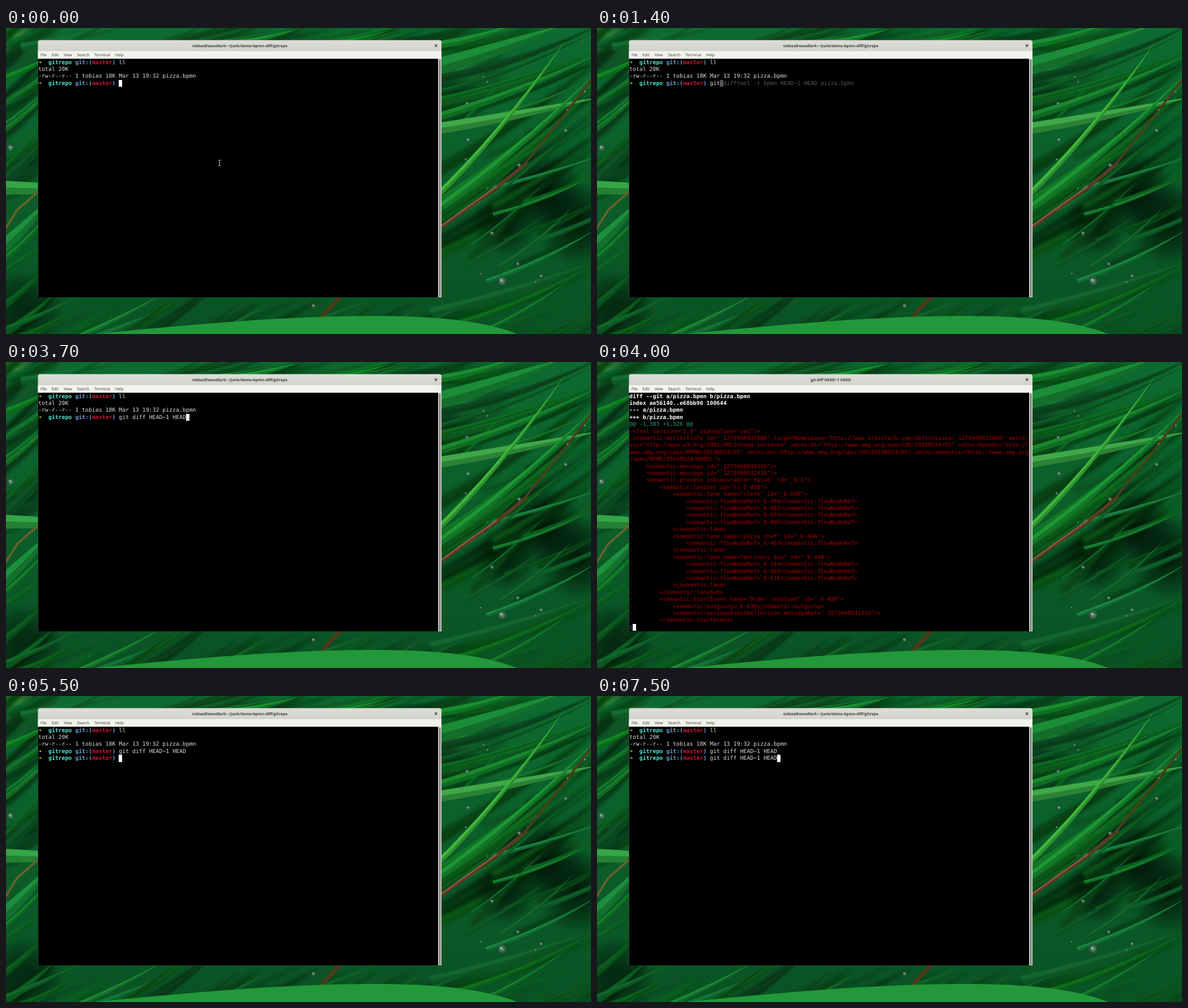
Write an HTML page with a canvas that moves like this. It is 1033 px wide and 542 px high and loops after 8 s.

```html
<!DOCTYPE html>
<html lang="en">
<head>
<meta charset="utf-8">
<title>Terminal diff</title>
<style>
  html, body { margin: 0; width: 100%; height: 100%; overflow: hidden; background: #0d5c26; }
  #stage { position: absolute; left: 0; top: 0; width: 1033px; height: 542px; overflow: hidden;
    text-rendering: geometricPrecision; }
  #stage > * { position: absolute; }
  #title, #menu { white-space: pre; font-family: "Open Sans", "Noto Sans", sans-serif; }
  #title { left: 57px; top: 22px; width: 712px; line-height: 19px; text-align: center;
    font-size: 6.8px; font-weight: 700; color: #3a3e40; }
  #menu { left: 61px; top: 41px; display: flex; gap: 8.8px; line-height: 15px;
    font-size: 6.9px; color: #33383a; }
  #term { left: 0; top: 0; }
  #term span { position: absolute; white-space: pre; height: 12.4px; line-height: 14.4px;
    font-family: "DejaVu Sans Mono", monospace; font-size: 9.85px; color: #dcdcdc; }
  #term .bold { color: #fff; font-weight: 700; }
  #term .arrow { color: #8ae234; font-weight: 700; }
  #term .dir { color: #4fe6d2; font-weight: 700; }
  #term .git { color: #729fcf; font-weight: 700; }
  #term .branch { color: #cb1630; font-weight: 700; }
  #term .hint { color: #555753; }
  #term .hunk { color: #2a9a7c; }
  #term .del { color: #a80000; }
  #term .cursor { background: #fff; }
  #term .ghost { background: #555753; color: #000; }
</style>
</head>
<body>
<div id="stage">
  <canvas id="art" width="1033" height="542"></canvas>
  <div id="title"></div>
  <div id="menu"><span>File</span><span>Edit</span><span>View</span><span>Search</span><span>Terminal</span><span>Help</span></div>
  <div id="term"></div>
  <svg id="beam" width="8" height="12" style="left:373px;top:233px">
    <path d="M1.5 1.2H3.4L4 1.8L4.6 1.2H6.5M4 1.8V10.2M1.5 10.8H3.4L4 10.2L4.6 10.8H6.5M3 6H5"
      fill="none" stroke="#b4b4b4" stroke-width="1.1"/>
  </svg>
</div>
<script>
const title = document.getElementById('title');
const term = document.getElementById('term');
const beam = document.getElementById('beam');
const ctx = document.getElementById('art').getContext('2d');

/* ---------- wallpaper ---------- */
let seed = 11;
function rnd(a = 0, b = 1) {
  seed = (seed * 16807) % 2147483647;
  return a + (b - a) * seed / 2147483647;
}

const green = light => `hsl(${rnd(128, 144)} ${rnd(66, 82)}% ${light}%)`;

function glow(x, y, r, color) {
  const g = ctx.createRadialGradient(x, y, 0, x, y, r);
  g.addColorStop(0, color);
  g.addColorStop(1, 'transparent');
  ctx.fillStyle = g;
  ctx.fillRect(x - r, y - r, 2 * r, 2 * r);
}

// Tapered leaf that sags below its chord, with a shaded lower half
function blade(x, y, dx, dy, w, color, sag = .12) {
  const len = Math.hypot(dx, dy);
  const nx = dy / len * w / 2, ny = -dx / len * w / 2;
  const cx = x + dx * .5, cy = y + dy * .5 + len * sag;
  const half = (a, b, fill) => {
    ctx.fillStyle = fill;
    ctx.beginPath();
    ctx.moveTo(x + nx * a, y + ny * a);
    ctx.quadraticCurveTo(cx + nx * a, cy + ny * a, x + dx, y + dy);
    ctx.quadraticCurveTo(cx + nx * b, cy + ny * b, x + nx * b, y + ny * b);
    ctx.fill();
  };
  half(1, -1, color);
  half(0, -1, 'rgba(0,40,12,.3)');
}

// Each place returns x, y, dx, dy for one leaf
const places = {
  right() {
    const y = rnd(40, 640), steep = Math.exp(-(((y - 320) / 90) ** 2));
    return [750, y, 300, -70 - 130 * steep - rnd(0, 60)];
  },
  rightTips() {
    const y = rnd(160, 600);
    return [rnd(780, 940), y, rnd(110, 220), -rnd(60, 150)];
  },
  left() { return [-20, rnd(20, 580), 110, -rnd(40, 130)]; },
  bottom() { return [rnd(-80, 740), 560, rnd(110, 240), -rnd(50, 100)]; },
  top() { return [rnd(0, 800), 34, rnd(110, 220), -rnd(20, 60)]; }
};

function grow(place, n, dark, light, width) {
  for (let i = 0; i < n; i++)
    blade(...places[place](), rnd(width * .4, width), green(rnd(dark, light)), rnd(.02, .1));
}

function stem(width, color, ...points) {
  ctx.beginPath();
  points.forEach(([x, y]) => ctx.lineTo(x, y));
  ctx.lineWidth = width;
  ctx.lineJoin = ctx.lineCap = 'round';
  ctx.strokeStyle = color;
  ctx.stroke();
}

function drop(x, y, r) {
  glow(x, y, r * 1.5, 'rgba(190,225,205,.75)');
  glow(x - r * .2, y - r * .2, r * .6, '#f0faf5');
}

function wallpaper() {
  const base = ctx.createLinearGradient(0, 0, 0, 542);
  base.addColorStop(0, '#0d6a30');
  base.addColorStop(1, '#0a5224');
  ctx.fillStyle = base;
  ctx.fillRect(0, 0, 1033, 542);
  glow(800, 75, 90, '#1c8c3c');
  glow(15, 10, 80, '#3b9a42');

  // Blurred and dark behind, sharp and bright in front
  for (let layer = 0; layer < 3; layer++) {
    const dark = 10 + layer * 4, light = 21 + layer * 6, width = 24 - layer * 4;
    ctx.filter = layer < 2 ? `blur(${3 - layer * 2}px)` : 'none';
    for (const place of ['right', 'left', 'bottom', 'top']) grow(place, 14 - layer * 3, dark, light, width);
    if (layer === 0) {
      glow(945, 292, 75, '#021207');
      glow(1010, 345, 75, '#031a0a');
      glow(880, 350, 55, '#04200c');
      glow(790, 130, 55, '#063517');
      glow(30, 500, 70, '#052c12');
    }
    grow('rightTips', 9, dark, light, width * .5);
  }

  // Leaves that stand out
  blade(750, 180, 300, -58, 20, '#3fa848', .02);
  blade(755, 303, 232, -280, 10, '#3fb83c', .08);
  blade(755, 326, 290, -250, 14, '#1c9634', .06);
  blade(750, 72, 240, -80, 30, '#1b8c38', .03);
  blade(-20, 282, 200, 6, 24, '#34a646', 0);
  blade(-20, 400, 105, -105, 24, '#1c8f3c', .06);

  stem(6, '#5a3a26', [760, 359], [815, 319], [866, 283], [918, 240]);
  stem(2, '#a0604a', [762, 355], [815, 317], [866, 281]);
  stem(4, '#4a3f1d', [914, 243], [985, 155], [1036, 88]);
  stem(4, '#67612c', [-5, 362], [20, 322], [60, 287]);
  stem(7, '#4c3b1b', [535, 545], [565, 503], [592, 474]);

  ctx.fillStyle = '#22983a';
  ctx.beginPath();
  ctx.moveTo(130, 545);
  ctx.bezierCurveTo(350, 522, 600, 500, 775, 515);
  ctx.quadraticCurveTo(860, 523, 910, 545);
  ctx.fill();

  for (let i = 0; i < 14; i++) drop(rnd(780, 1025), rnd(70, 460), rnd(2, 4));
  drop(876, 448, 8);
  drop(8, 212, 6);
  drop(543, 492, 4);
}

/* ---------- window ---------- */
function rect(x, y, w, h, color) {
  ctx.fillStyle = color;
  ctx.fillRect(x, y, w, h);
}

function windowFrame() {
  const bar = ctx.createLinearGradient(0, 21, 0, 41);
  bar.addColorStop(0, '#dfdeda');
  bar.addColorStop(1, '#d3d2cc');
  ctx.fillStyle = bar;
  ctx.beginPath();
  ctx.roundRect(56.4, 21.4, 712.6, 455.6, [4, 4, 0, 0]);
  ctx.fill();
  rect(56.4, 41, 712.6, 13.5, '#f3f3ee');
  rect(56.4, 54.5, 706.6, 422.5, '#000');
  rect(763, 54.5, 6, 422.5, '#dddcd8');
  rect(764.5, 56, 3, 420, '#7d807e');
  stem(1.2, '#2e3436', [757.3, 29.3], [761.1, 33.1]);
  stem(1.2, '#2e3436', [761.1, 29.3], [757.3, 33.1]);
}

/* ---------- terminal ---------- */
const CELL = 5.93, ROW = 12.4, COLS = 119;
const TOOL = 'git difftool -t bpmn HEAD~1 HEAD pizza.bpmn';
const DIFF = 'git diff HEAD~1 HEAD';
const HOME = 'tobias@woodlark:~/junk/demo-bpmn-diff/gitrepo';

function put(row, col, text, cls = '') {
  const el = document.createElement('span');
  el.className = cls;
  el.textContent = text;
  el.style.left = 57 + col * CELL + 'px';
  el.style.top = 54.6 + row * ROW + 'px';
  term.append(el);
  return el;
}

function cursor(row, col, cls = 'cursor', char = ' ') {
  put(row, col, char, cls).style.width = CELL + 'px';
}

function prompt(row, cmd) {
  put(row, 0, '➜', 'arrow');
  put(row, 3, 'gitrepo', 'dir');
  put(row, 11, 'git:(', 'git');
  put(row, 16, 'master', 'branch');
  put(row, 22, ')', 'git');
  put(row, 24, cmd);
}

const sp = n => ' '.repeat(n);
const refs = ids => ids.map(id => `-${sp(16)}<semantic:flowNodeRef>_6-${id}</semantic:flowNodeRef>`);
const lane = (name, id, ...ids) => [
  `-${sp(12)}<semantic:lane name="${name}" id="_6-${id}">`, ...refs(ids), `-${sp(12)}</semantic:lane>`];

const head = ['diff --git a/pizza.bpmn b/pizza.bpmn', 'index ae56140..e68bb90 100644',
  '--- a/pizza.bpmn', '+++ b/pizza.bpmn'];
const omg = 'http://www.omg.org/spec/';
const removed = [
  '-<?xml version="1.0" standalone="yes"?>',
  '-<semantic:definitions id="_1275940932088" ' +
    'targetNamespace="http://www.trisotech.com/definitions/_1275940932088" ' +
    'xmlns:xsi="http://www.w3.org/2001/XMLSchema-instance" ' +
    `xmlns:di="${omg}DD/20100524/DI" xmlns:bpmndi="${omg}BPMN/20100524/DI" ` +
    `xmlns:dc="${omg}DD/20100524/DC" xmlns:semantic="${omg}BPMN/20100524/MODEL">`,
  `-${sp(4)}<semantic:message id="_1275940932310"/>`,
  `-${sp(4)}<semantic:message id="_1275940932433"/>`,
  `-${sp(4)}<semantic:process isExecutable="false" id="_6-1">`,
  `-${sp(8)}<semantic:laneSet id="ls_6-438">`,
  ...lane('clerk', 650, 450, 652, 674, 695),
  ...lane('pizza chef', 446, 463),
  ...lane('delivery boy', 448, 514, 565, 616),
  `-${sp(8)}</semantic:laneSet>`,
  `-${sp(8)}<semantic:startEvent name="Order received" id="_6-450">`,
  `-${sp(12)}<semantic:outgoing>_6-630</semantic:outgoing>`,
  `-${sp(12)}<semantic:messageEventDefinition messageRef="_1275940932310"/>`,
  `-${sp(8)}</semantic:startEvent>`
];

function pager(lit) {
  head.forEach((line, i) => put(i, 0, line, 'bold'));
  put(4, 0, '@@ -1,383 +1,326 @@', 'hunk');
  let row = 5;
  for (const line of removed)
    for (let i = 0; i < line.length; i += COLS) put(row++, 0, line.slice(i, i + COLS), 'del');
  put(33, 0, ':');
  if (lit) cursor(33, 1);
}

function shell({ row, text, typed, solid }, lit) {
  prompt(0, 'll');
  put(1, 0, 'total 20K');
  put(2, 0, '-rw-r--r-- 1 tobias 18K Mar 13 19:32 pizza.bpmn');
  if (row === 4) prompt(3, DIFF);
  prompt(row, text.slice(0, typed));
  const col = 24 + typed;
  put(row, col, text.slice(typed), 'hint');
  if (lit) cursor(row, col, typed < text.length && !solid ? 'ghost' : 'cursor', text[typed]);
}

/* ---------- timeline ---------- */
const LOOP = 8000, BLINK = 600;
const steps = [];
const show = (at, row, text = '', typed = text.length, solid = false) =>
  steps.push({ at, row, text, typed, solid });
const type = (row, text, typed, ...times) =>
  times.forEach((at, i) => show(at, row, text, typed + i));
const page = (at, name) => steps.push({ at, name });

show(0, 3);
type(3, TOOL, 1, 1100, 1200, 1400, 1600, 1700, 1900, 2000);
show(2400, 3, TOOL);
show(2600, 3, DIFF);
page(4000, DIFF);
page(5000, HOME);
show(5500, 4);
type(4, DIFF, 2, 5800);
type(4, DIFF, 4, 6000, 6100, 6300, 6400, 7100);
show(7300, 4, DIFF, 8, true);
show(7500, 4, DIFF);

// The cursor goes dark for one blink, or until the next key
const blinks = [100, 3100, 4300, 7000];

let shown = '';
function render(ms) {
  const step = steps.findLast(s => s.at <= ms);
  const lit = !blinks.some(b => b >= step.at && ms >= b && ms < b + BLINK);
  const key = step.at + ' ' + lit;
  if (key === shown) return;
  shown = key;
  term.textContent = '';
  title.textContent = step.name || HOME;
  beam.style.display = step.at ? 'none' : '';
  if (step.name) pager(lit);
  else shell(step, lit);
}

wallpaper();
windowFrame();
render(0);
const begin = performance.now();
(function tick() {
  render((performance.now() - begin) % LOOP);
  requestAnimationFrame(tick);
})();
</script>
</body>
</html>
```
